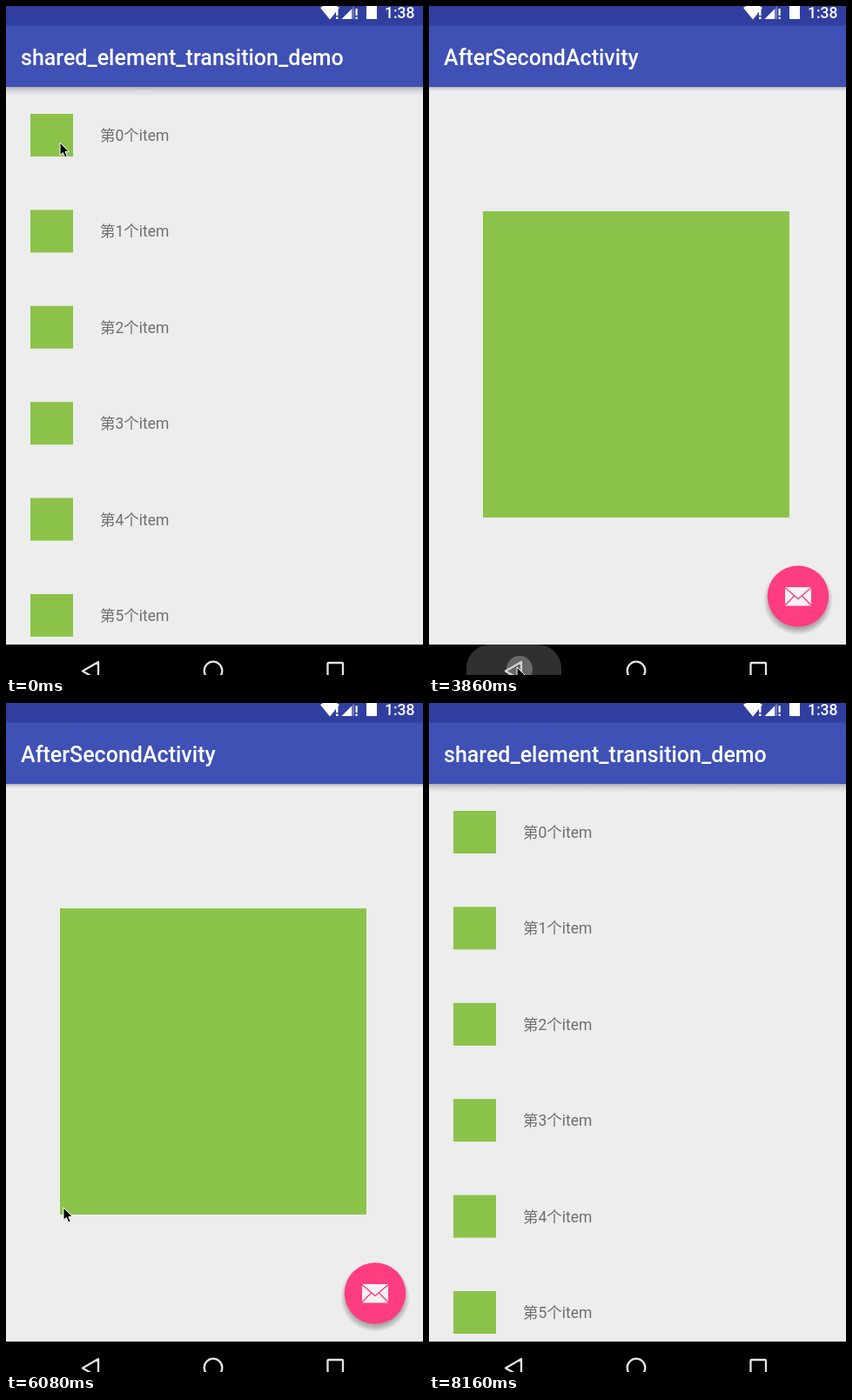
An HTML page for the animation above (8.31 s loop, 479 by 769 pixels).

```html
<!DOCTYPE html>
<html lang="zh-CN">
<head>
<meta charset="utf-8">
<title>Shared element transition</title>
<style>
  html, body { margin: 0; width: 100%; height: 100%; overflow: hidden; background: #ededed; }
  svg { display: block; width: 100vw; height: 100vh; }
  text { font-family: Roboto, "Noto Sans CJK SC", "Noto Sans CJK", sans-serif; }
  .title { font-size: 25px; font-weight: 500; }
  .row { font-size: 17.5px; fill: #6f6f6f; }
  .clock { font-size: 17.5px; font-weight: 500; fill: #fff; }
</style>
</head>
<body>
<svg viewBox="0 0 479 769">
  <defs>
    <linearGradient id="shade" x2="0" y2="1">
      <stop offset="0" stop-opacity=".27"/>
      <stop offset=".4" stop-opacity=".1"/>
      <stop offset="1" stop-opacity="0"/>
    </linearGradient>
    <radialGradient id="fabShade">
      <stop offset=".8" stop-opacity=".3"/>
      <stop offset="1" stop-opacity="0"/>
    </radialGradient>
  </defs>
  <rect width="479" height="769" fill="#ededed"/>

  <g id="list">
    <rect y="93" width="479" height="10" fill="url(#shade)"/>
    <g id="rows"></g>
  </g>

  <g id="detail">
    <rect y="93" width="479" height="5" fill="url(#shade)"/>
    <circle cx="424" cy="683" r="40" fill="url(#fabShade)"/>
    <circle cx="424" cy="678.5" r="35.3" fill="#ff3d80"/>
    <rect x="409" y="668" width="30" height="21.5" fill="#f3f3f3"/>
    <path d="M409 668.5L424 681.500L439 668.500M409 689L419.500 678M439 689L428.500 678" fill="none" stroke="#ff3d80" stroke-width="1.4"/>
  </g>

  <rect id="hero" fill="#8bc34a"/>

  <g id="chrome">
    <rect y="22" width="479" height="71" fill="#3f51b5"/>
    <rect y="734" width="479" height="35"/>
  </g>
  <text id="detailTitle" class="title" x="17" y="67.500">AfterSecondActivity</text>
  <text id="listTitle" class="title" x="17" y="67.500">shared_element_transition_demo</text>

  <rect width="479" height="22.500" fill="#303f9f"/>
  <g fill="#fff">
    <path d="M361 2Q372 -6 383 2L377.500 8.500V9L372 15.500Z"/>
    <path d="M379 3h2.500v8h-2.500zM379 12.500h2.500v2.500h-2.500z"/>
    <path d="M385.500 15L397 3.500V15Z"/>
    <path d="M397 3.500L400 0V15H397Z" opacity=".3"/>
    <path d="M401.500 3h2.200v8h-2.200zM401.500 12.500h2.200v2.500h-2.200z"/>
    <rect x="414" width="12" height="15"/>
  </g>
  <text class="clock" x="435" y="14">1:38</text>

  <rect id="pill" y="734" height="70" rx="27" fill="#fff"/>
  <g fill="none" stroke="#e4e4e4" stroke-width="2.300">
    <path d="M106 754V775L88 764.500Z" stroke-linejoin="round"/>
    <circle cx="238" cy="764" r="10.300"/>
    <rect x="369.500" y="755" width="17.500" height="18" rx="1"/>
  </g>

  <circle id="touch" r="15" fill="#b8b8b8"/>
  <path id="cursor" d="M0 0V14.500L3.300 11.500L5.700 17L8.300 15.900L6 10.500H10.500Z" fill="#000" stroke="#fff" stroke-width="1"/>
</svg>
<script>
const LOOP = 8310, FIRST = 588, STEP = 148.2;
const SPAN = 300 / STEP;              // transition length, in steps
const SIDE = 49, BIG = 352;
const $ = id => document.getElementById(id);
const set = (el, attrs) => { for (const a in attrs) el.setAttribute(a, attrs[a]); };
const clamp = v => Math.min(1, Math.max(0, v));
const mix = (a, b, p) => a + (b - a) * p;
const rowY = i => 148.5 + 110.4 * i;

// start step of each opening and closing, with the row it belongs to
const visits = [
  { row: 0, open: 0.69, close: 22 },
  { row: 3, open: 33.69, close: 42.55 }
];

// pointer stops: step, x, y
const stops = [
  [5, 62, 157], [6, 63, 205], [7, 74, 520], [8, 82, 694], [9, 92, 728],
  [11, 81, 747], [13, 81, 747], [14, 91, 738], [15, 97, 747],
  [18, 97, 748], [20, 101, 760], [25, 101, 760], [26, 88, 670],
  [27, 62, 540], [28, 43, 455], [29, 37, 424], [31, 53, 473],
  [36, 53, 473], [37, 66, 580], [38, 90, 710], [39, 103, 758],
  [40, 104, 760], [45, 104, 760], [46, 104, 790], [47, 377, 790],
  [48, 379, 759], [49, 398, 755], [50, 420, 761], [51, 420, 790]
];

// step: touch strength
const touches = { 0: .45, 1: .2, 22: .42, 23: .2, 33: .45, 34: .2, 42: .42, 43: .2 };

const thumbs = [];
for (let i = 0; i < 6; i++) {
  const make = (name, attrs) => {
    const el = document.createElementNS("http://www.w3.org/2000/svg", name);
    set(el, attrs);
    return $("rows").appendChild(el);
  };
  thumbs.push(make("rect", { x: 28, y: rowY(i) - SIDE / 2, width: SIDE, height: SIDE, fill: "#8bc34a" }));
  make("text", { class: "row", x: 108, y: rowY(i) + 6.5 }).textContent = `第${i}个item`;
}

// cubic-bezier(.4, 0, .2, 1)
function ease(t) {
  let lo = 0, hi = 1, s = .5;
  for (let i = 0; i < 24; i++) {
    s = (lo + hi) / 2;
    const x = 1.2 * s * (1 - s) ** 2 + .6 * s * s * (1 - s) + s ** 3;
    if (x < t) lo = s; else hi = s;
  }
  return 3 * s * s * (1 - s) + s ** 3;
}

function pointerAt(k) {
  const n = stops.findIndex(s => s[0] >= k);
  if (n < 0) return stops[stops.length - 1].slice(1);
  if (n === 0) return stops[0].slice(1);
  const [k0, x0, y0] = stops[n - 1], [k1, x1, y1] = stops[n];
  const p = (k - k0) / (k1 - k0);
  return [mix(x0, x1, p), mix(y0, y1, p)];
}

function drawTitle(el, share) {
  const front = share > .5;
  set(el, { fill: front ? "#fff" : "#4656b4", opacity: front ? share : share ? .3 : 0 });
}

function draw(time) {
  const k = Math.floor((time % LOOP - FIRST) / STEP);
  const { row, open, close } = visits[k < 30 ? 0 : 1];
  const opened = clamp((k - open) / SPAN), closed = clamp((k - close) / SPAN);
  const fade = opened - closed;
  const grow = ease(opened) - ease(closed);
  const moving = fade > 0;

  set($("list"), { opacity: 1 - fade });
  set($("detail"), { opacity: fade });
  set($("chrome"), { opacity: Math.max(fade, 1 - fade) });
  drawTitle($("listTitle"), 1 - fade);
  drawTitle($("detailTitle"), fade);
  thumbs.forEach((el, i) => set(el, { opacity: moving && i === row ? 0 : 1 }));

  const side = mix(SIDE, BIG, grow);
  set($("hero"), {
    x: mix(28, 62, grow), y: mix(rowY(row) - SIDE / 2, 236, grow),
    width: side, height: side, opacity: moving ? 1 : 0
  });

  const [x, y] = pointerAt(k);
  set($("cursor"), { transform: `translate(${x} ${y})` });
  set($("touch"), { cx: x + 3, cy: y + 2, opacity: touches[k] || 0 });

  const pressed = k === 22 || k === 42, spread = k === 23 || k === 43;
  const width = pressed ? 109 : 132;
  set($("pill"), { x: 97.5 - width / 2, width, opacity: pressed ? .19 : spread ? .13 : 0 });
}

const began = performance.now();
function tick() {
  draw(performance.now() - began);
  requestAnimationFrame(tick);
}
tick();
</script>
</body>
</html>
```
